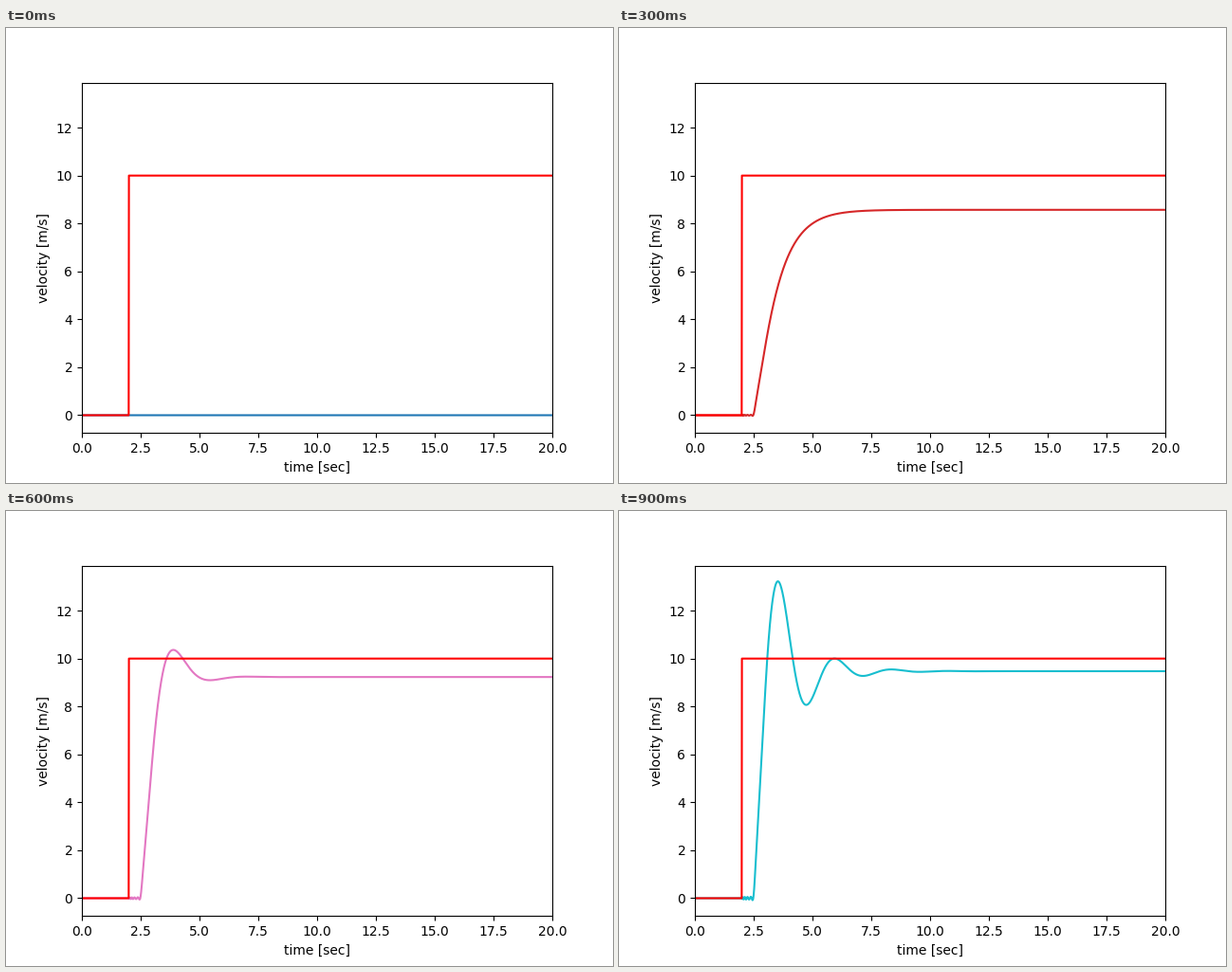
These frames come from a looping animation (640 by 480 pixels, 1000 ms). A matplotlib script:

```python
from math import factorial

import matplotlib.pyplot as plt
import numpy as np
from matplotlib.animation import FuncAnimation

FRAMES = 10
TARGET = 10.0        # commanded velocity, m/s
STEP_TIME = 2.0      # s
DELAY = 0.5          # dead time, s
TIME_CONSTANT = 10.0 # s
PADE_ORDER = 10


def pade(order):
    """Numerator and denominator of exp(-s), highest power first."""
    den = np.array([
        factorial(2 * order - k) * factorial(order)
        / (factorial(2 * order) * factorial(k) * factorial(order - k))
        for k in range(order, -1, -1)
    ])
    signs = (-1.0) ** np.arange(order, -1, -1)
    return den * signs, den


def step_response(gain, time):
    """Proportional control of a first-order plant with dead time."""
    num, den = pade(PADE_ORDER)
    num = gain * num
    closed = np.polyadd(np.polymul([TIME_CONSTANT / DELAY, 1], den), num)
    poles = np.roots(closed)
    residues = np.polyval(num, poles) / (
        poles * np.polyval(np.polyder(closed), poles))
    elapsed = np.maximum(time - STEP_TIME, 0) / DELAY
    modes = np.exp(np.outer(elapsed, poles)) @ residues
    response = TARGET * (num[-1] / closed[-1] + modes.real)
    return np.where(time < STEP_TIME, 0, response)


time = np.linspace(0, 20, 2001)
reference = np.where(time < STEP_TIME - 1e-9, 0, TARGET)

fig, ax = plt.subplots(figsize=(6.4, 4.8), dpi=100)
ax.set(xlim=(0, 20), ylim=(-0.74, 13.88),
       xlabel="time [sec]", ylabel="velocity [m/s]")
velocity_line, = ax.plot([], [], lw=1.5)
ax.plot(time, reference, "r", lw=1.5)


def update(i):
    velocity_line.set_data(time, step_response(2 * i, time))
    velocity_line.set_color(f"C{i}")
    return velocity_line,


animation = FuncAnimation(fig, update, frames=FRAMES, interval=100, repeat=True)
plt.show()
```
